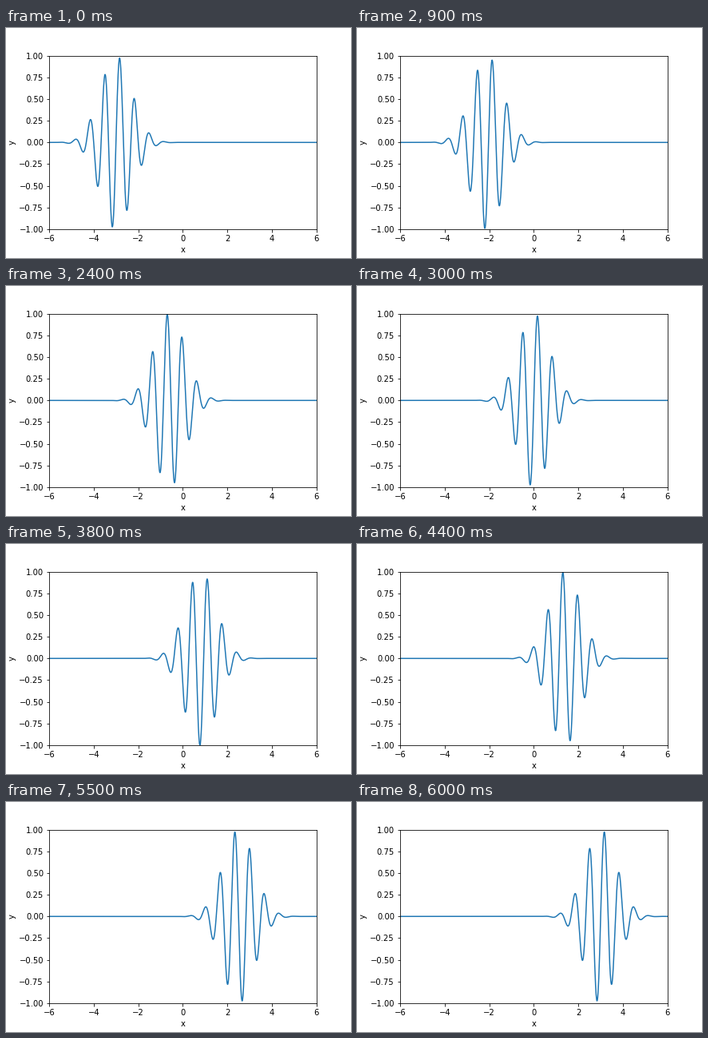
These frames come from a looping animation (432 by 288 pixels, 6100 ms). A matplotlib script:

```python
import numpy as np
import matplotlib.pyplot as plt
from matplotlib.animation import FuncAnimation

STEPS = 61
INTERVAL = 100  # ms

x = np.linspace(-6, 6, 1001)


def packet(t):
    """Gaussian envelope at unit speed over a carrier with a third of it."""
    return np.exp(-(x - t) ** 2) * np.sin(np.pi * (3 * x - t))


fig, ax = plt.subplots(figsize=(6, 4), dpi=72)
fig.subplots_adjust(left=0.125, right=0.9, bottom=0.125, top=0.88)
ax.set(xlim=(-6, 6), ylim=(-1, 1), xlabel="x", ylabel="y")
line, = ax.plot(x, packet(-3), color="#1f77b4", lw=1.5)


def update(i):
    line.set_ydata(packet(-3 + i / 10))
    return line,


anim = FuncAnimation(fig, update, frames=STEPS, interval=INTERVAL,
                     repeat=True, repeat_delay=0)
plt.show()
```
